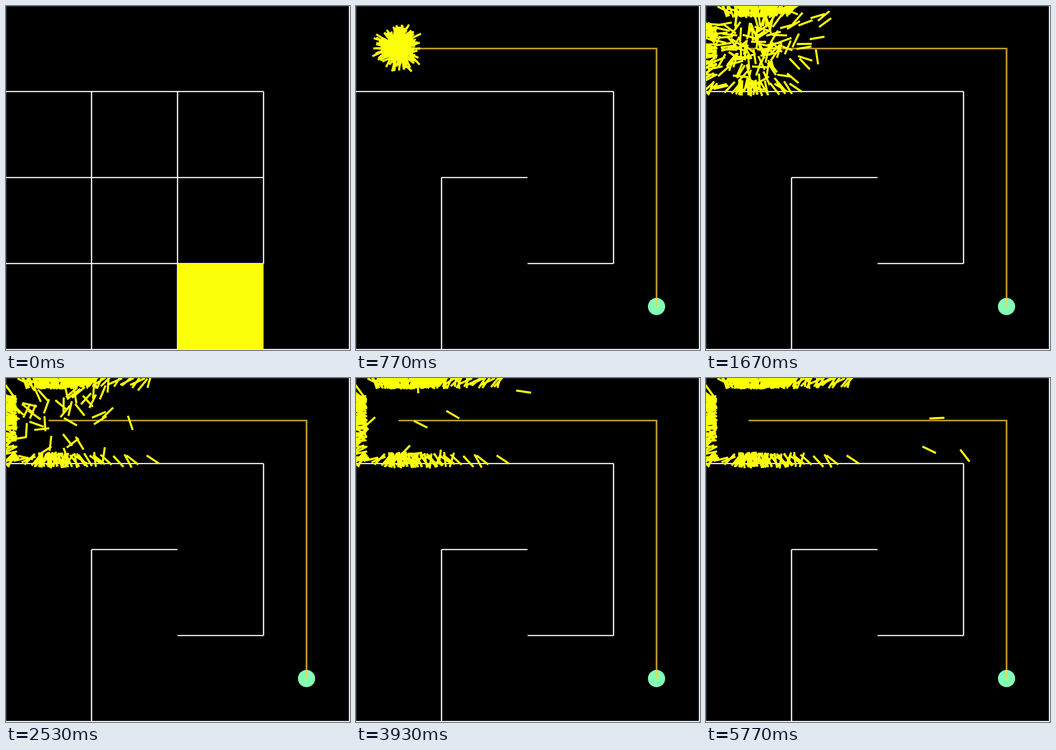
Animation of 748 by 748 pixels, one loop 5810 ms. Source, as an HTML page with a canvas:

```html
<!DOCTYPE html>
<html lang="en">
<head>
<meta charset="utf-8">
<title>Maze swarm</title>
<style>
  html, body { margin: 0; width: 100%; height: 100%; overflow: hidden; background: #000; }
  canvas { display: block; width: 748px; height: 748px; }
</style>
</head>
<body>
<canvas id="stage" width="748" height="748"></canvas>
<script>
const ctx = document.getElementById('stage').getContext('2d');
const LOOP = 5810;
const SIZE = 748;
const CELL = SIZE / 4;
const HOME = CELL / 2;
const GOAL = CELL * 3.5;
const YELLOW = '#fbff08';
const SWARM_START = 10;
const FLIGHT = 164;

// Carving moves from the top-left cell: right, down, left, up.
const moves = { R: [1, 0], D: [0, 1], L: [-1, 0], U: [0, -1] };
const route = [[0, 0]];
for (const m of 'RRRDDDLLURULLDD') {
  const [c, r] = route[route.length - 1];
  route.push([c + moves[m][0], r + moves[m][1]]);
}
const FIRST = 7;
const LAST = route.length - 1;

function seeded(seed) {
  return () => {
    seed = (seed + 0x6D2B79F5) | 0;
    let t = Math.imul(seed ^ (seed >>> 15), 1 | seed);
    t = (t + Math.imul(t ^ (t >>> 7), 61 | t)) ^ t;
    return ((t ^ (t >>> 14)) >>> 0) / 4294967296;
  };
}
const rand = seeded(2024);

const hitsWall = (x, y) => x < 10 || y < 10 || y > CELL - 9.5;

// A flight is a list of poses [x, y, angle]; the last one is where it stays.
function fly() {
  const poses = [];
  let x = HOME, y = HOME, vx = 0, vy = 0;
  while (poses.length < FLIGHT) {
    poses.push([x, y, Math.atan2(vy, vx)]);
    if (hitsWall(x, y)) break;
    const a = rand() * Math.PI * 2;
    vx += 0.75 * Math.cos(a);
    vy += 0.75 * Math.sin(a) - 0.02;
    const brake = Math.min(1, 7.5 / Math.hypot(vx, vy));
    vx *= brake;
    vy *= brake;
    x += vx;
    y += vy;
  }
  return poses;
}

// Keep flights in the corridor, and crashes near the start but off its corner.
function fits(poses) {
  const [x, y] = poses[poses.length - 1];
  const crashed = hitsWall(x, y);
  return poses.every(p => p[0] < 590) && !(crashed && x > 330) && !(x < 40 && y < 28);
}

const swarm = [];
function addFlights(count, minSteps, maxSteps) {
  while (count > 0) {
    const poses = fly();
    if (poses.length < minSteps || poses.length > maxSteps || !fits(poses)) continue;
    swarm.push(poses);
    count--;
  }
}
addFlights(3, FLIGHT, FLIGHT);
addFlights(1, 130, FLIGHT - 1);
addFlights(18, 91, 129);
addFlights(250, 1, 90);

function polyline(points, color, width) {
  ctx.strokeStyle = color;
  ctx.lineWidth = width;
  ctx.beginPath();
  points.forEach(([x, y]) => ctx.lineTo(x, y));
  ctx.stroke();
}

function drawWalls(carved) {
  const open = new Set();
  for (let i = 1; i <= carved; i++) {
    const [a, b] = [route[i - 1], route[i]];
    open.add(a + '|' + b).add(b + '|' + a);
  }
  const wall = (...points) => polyline(points, '#fff', 2.7);
  for (let c = 0; c < 4; c++) {
    for (let r = 0; r < 4; r++) {
      const x = (c + 1) * CELL, y = (r + 1) * CELL;
      const key = [c, r] + '|';
      if (!open.has(key + [c + 1, r])) wall([x, y - CELL], [x, y]);
      if (!open.has(key + [c, r + 1])) wall([x - CELL, y], [x, y]);
    }
  }
  wall([0, SIZE], [0, 0], [SIZE, 0]);
}

function drawGoal() {
  ctx.fillStyle = '#84ffb4';
  ctx.beginPath();
  ctx.arc(GOAL, GOAL, CELL / 10, 0, Math.PI * 2);
  ctx.fill();
  polyline([[HOME, HOME], [GOAL, HOME], [GOAL, GOAL]], 'rgba(255, 203, 58, 0.75)', 3.74);
}

function drawSwarm(step) {
  ctx.strokeStyle = YELLOW;
  ctx.lineWidth = 4.5;
  ctx.beginPath();
  for (const poses of swarm) {
    const [x, y, a] = poses[Math.min(step, poses.length - 1)];
    const dx = 16.3 * Math.cos(a), dy = 16.3 * Math.sin(a);
    ctx.moveTo(x - dx, y - dy);
    ctx.lineTo(x + dx, y + dy);
  }
  ctx.stroke();
}

function draw(time) {
  // The scene advances 30 times a second, on 10 ms ticks.
  const tick = Math.floor((Math.floor(time / 10) + 0.5) * 0.3);
  const carved = Math.min(FIRST + tick, LAST);

  ctx.fillStyle = '#000';
  ctx.fillRect(0, 0, SIZE, SIZE);
  ctx.save();
  ctx.translate(-1, -1);
  drawWalls(carved);
  if (tick < SWARM_START) {
    const [c, r] = route[carved];
    ctx.fillStyle = YELLOW;
    ctx.fillRect(c * CELL, r * CELL, CELL, CELL);
  } else {
    drawGoal();
    drawSwarm(tick - SWARM_START);
  }
  ctx.restore();
}

const start = performance.now();
function loop() {
  draw((performance.now() - start) % LOOP);
  requestAnimationFrame(loop);
}
loop();
</script>
</body>
</html>
```
